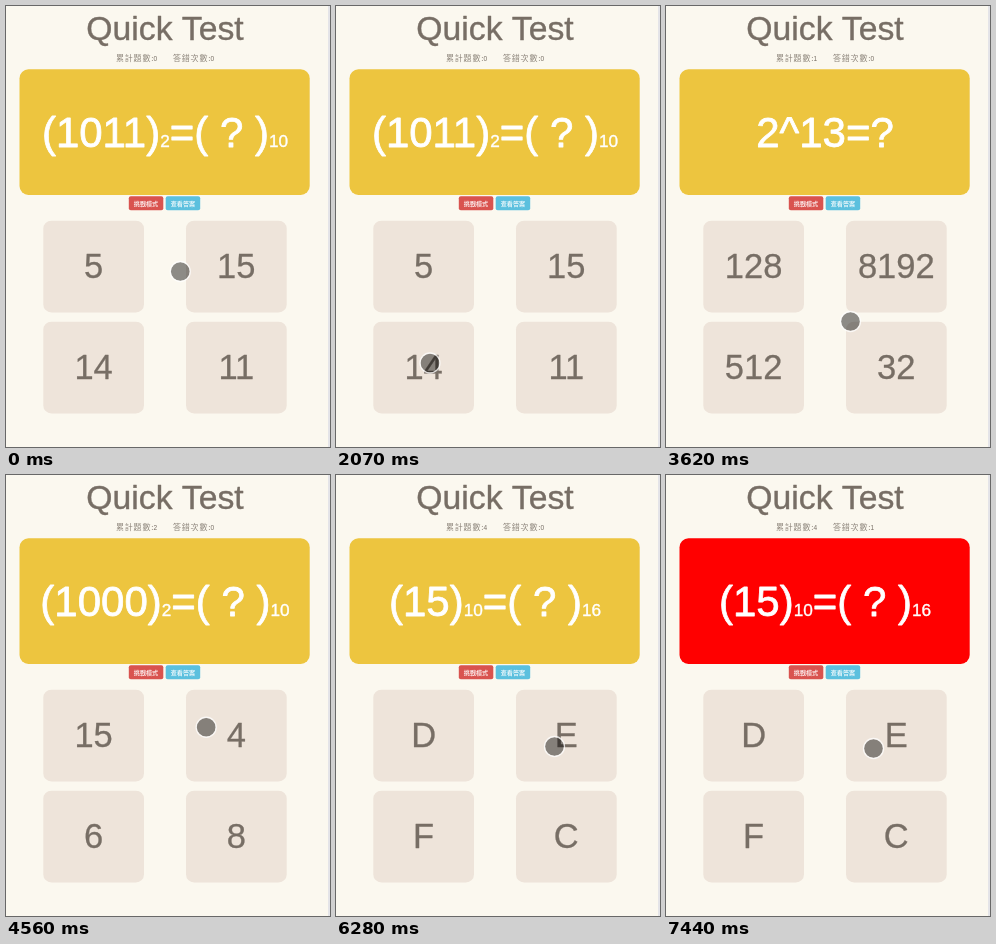
Recreate the animation shown at these times as an HTML page with a canvas. Size 324x441 px, loop 8 s.

```html
<!DOCTYPE html>
<html lang="zh-Hant">
<head>
<meta charset="utf-8">
<title>Quick Test</title>
<style>
  html, body { margin: 0; width: 100%; height: 100%; overflow: hidden; background: #fbf8ef; }
  canvas { display: block; width: 324px; height: 441px; }
</style>
</head>
<body>
<canvas id="stage" width="324" height="441"></canvas>
<script>
const ctx = document.getElementById('stage').getContext('2d');
const LOOP = 8000;
const CENTER = 159;
const SANS = '"Liberation Sans", Arial, sans-serif';
const CJK = '"Noto Sans CJK TC", "Noto Sans CJK", sans-serif';
const INK = '#776e65';

// "_" toggles subscript inside a question
const rounds = [
  { at: 0,    ask: '(1011)_2_=( ? )_10', cards: ['5', '15', '14', '11'] },
  { at: 3020, ask: '2^13=?',             cards: ['128', '8192', '512', '32'] },
  { at: 4090, ask: '(1000)_2_=( ? )_10', cards: ['15', '4', '6', '8'] },
  { at: 5190, ask: '(13)_10_=( ? )_16',  cards: ['E', 'D', 'F', 'C'] },
  { at: 6280, ask: '(15)_10_=( ? )_16',  cards: ['D', 'E', 'F', 'C'] }
];
const WRONG_AT = 7440;

const start = [174.3, 265.5];
// Pointer strokes: first and last step time, step count, end, optional midpoint, easing strength
const strokes = [
  { from: 1040, to: 1200, steps: 3, end: [160, 268], ease: 0.5 },
  { from: 1670, to: 2070, steps: 6, end: [94, 357], mid: [120, 305], ease: 0.8 },
  { from: 2540, to: 2780, steps: 4, end: [232.5, 366.5], ease: 0.6 },
  { from: 3400, to: 3940, steps: 8, end: [215, 246], mid: [184.5, 315.5], ease: 0.4 },
  { from: 4560, to: 5030, steps: 7, end: [210, 324], mid: [170, 282], ease: 0.4 },
  { from: 5890, to: 6040, steps: 3, end: [218.5, 271.5], ease: 0.5 },
  { from: 6970, to: 7130, steps: 3, end: [207.5, 273.5], ease: 0.5 }
];

const soften = (p, k) => p - k * Math.sin(2 * Math.PI * p) / (2 * Math.PI);

// Parabola through a, m (halfway) and b
const through = (a, m, b, u) =>
  a + (4 * m - 3 * a - b) * u + 2 * (a - 2 * m + b) * u * u;

function pointerAt(t) {
  let pos = start;
  for (const s of strokes) {
    if (t < s.from) break;
    // Steps land on a coarse clock, so allow a little slack
    const done = Math.floor((t - s.from) / (s.to - s.from) * (s.steps - 1) + 0.15) + 1;
    const u = soften(Math.min(done / s.steps, 1), s.ease);
    pos = pos.map((v, i) => {
      const mid = s.mid ? s.mid[i] : (v + s.end[i]) / 2;
      return through(v, mid, s.end[i], u);
    });
  }
  return pos;
}

function box(x, y, w, h, r, color) {
  ctx.fillStyle = color;
  ctx.beginPath();
  ctx.roundRect(x, y, w, h, r);
  ctx.fill();
}

// "heavy" thickens the glyphs by that many pixels
function label(text, x, y, font, color, align = 'center', heavy = 0) {
  ctx.font = font;
  ctx.fillStyle = ctx.strokeStyle = color;
  ctx.textAlign = align;
  ctx.fillText(text, x, y);
  if (heavy) {
    ctx.lineWidth = heavy;
    ctx.lineJoin = 'round';
    ctx.strokeText(text, x, y);
  }
}

function question(ask) {
  const runs = ask.split('_').map((text, i) => {
    const sub = i % 2 === 1;
    const font = `${sub ? 17.2 : 42}px ${SANS}`;
    ctx.font = font;
    return { text, font, heavy: sub ? 0.4 : 0.8, width: ctx.measureText(text).width };
  });
  let x = CENTER - runs.reduce((sum, r) => sum + r.width, 0) / 2;
  for (const r of runs) {
    label(r.text, x, 141, r.font, '#fff', 'left', r.heavy);
    x += r.width;
  }
}

function counter(name, value, x) {
  ctx.letterSpacing = '0.8px';
  label(name + ':', x, 55, `8px ${CJK}`, '#8d857b', 'left');
  ctx.letterSpacing = '0px';
  label(value, x + 39.3, 54.8, `6.5px ${SANS}`, INK);
}

function button(text, x, color) {
  box(x, 190.3, 34.5, 14, 2, color);
  label(text, x + 17.2, 199.7, `bold 6.1px ${CJK}`, 'rgba(255,255,255,0.85)');
}

function pointer([x, y]) {
  ctx.beginPath();
  ctx.arc(x, y, 9.5, 0, 2 * Math.PI);
  ctx.fillStyle = 'rgba(0,0,0,0.44)';
  ctx.fill();
  ctx.beginPath();
  ctx.arc(x, y, 10, 0, 2 * Math.PI);
  ctx.lineWidth = 1.3;
  ctx.strokeStyle = 'rgba(255,255,255,0.75)';
  ctx.stroke();
}

function draw(t) {
  const solved = rounds.filter(r => r.at <= t).length - 1;
  const { ask, cards } = rounds[solved];
  const wrong = t >= WRONG_AT;

  ctx.fillStyle = '#fbf8ef';
  ctx.fillRect(0, 0, 324, 441);
  ctx.fillStyle = '#e4e4e8';
  ctx.fillRect(322, 0, 2, 441);

  label('Quick Test', CENTER, 34, `33.7px ${SANS}`, INK, 'center', 0.4);
  counter('累計題數', solved, 110);
  counter('答錯次數', wrong ? 1 : 0, 167);

  box(13.5, 63.3, 290.2, 125.7, 9, wrong ? '#f00' : '#edc53f');
  question(ask);
  button('挑戰模式', 122.8, '#d9534f');
  button('查看答案', 159.7, '#5bc0de');

  cards.forEach((text, i) => {
    const x = i % 2 ? 180 : 37.3;
    const y = i < 2 ? 214.7 : 315.7;
    box(x, y, 100.7, 91.7, 8, '#eee4da');
    label(text, x + 50.3, y + 57, `34.5px ${SANS}`, INK, 'center', 0.3);
  });

  pointer(pointerAt(t));
}

function frame() {
  draw(performance.now() % LOOP);
  requestAnimationFrame(frame);
}
frame();
</script>
</body>
</html>
```
